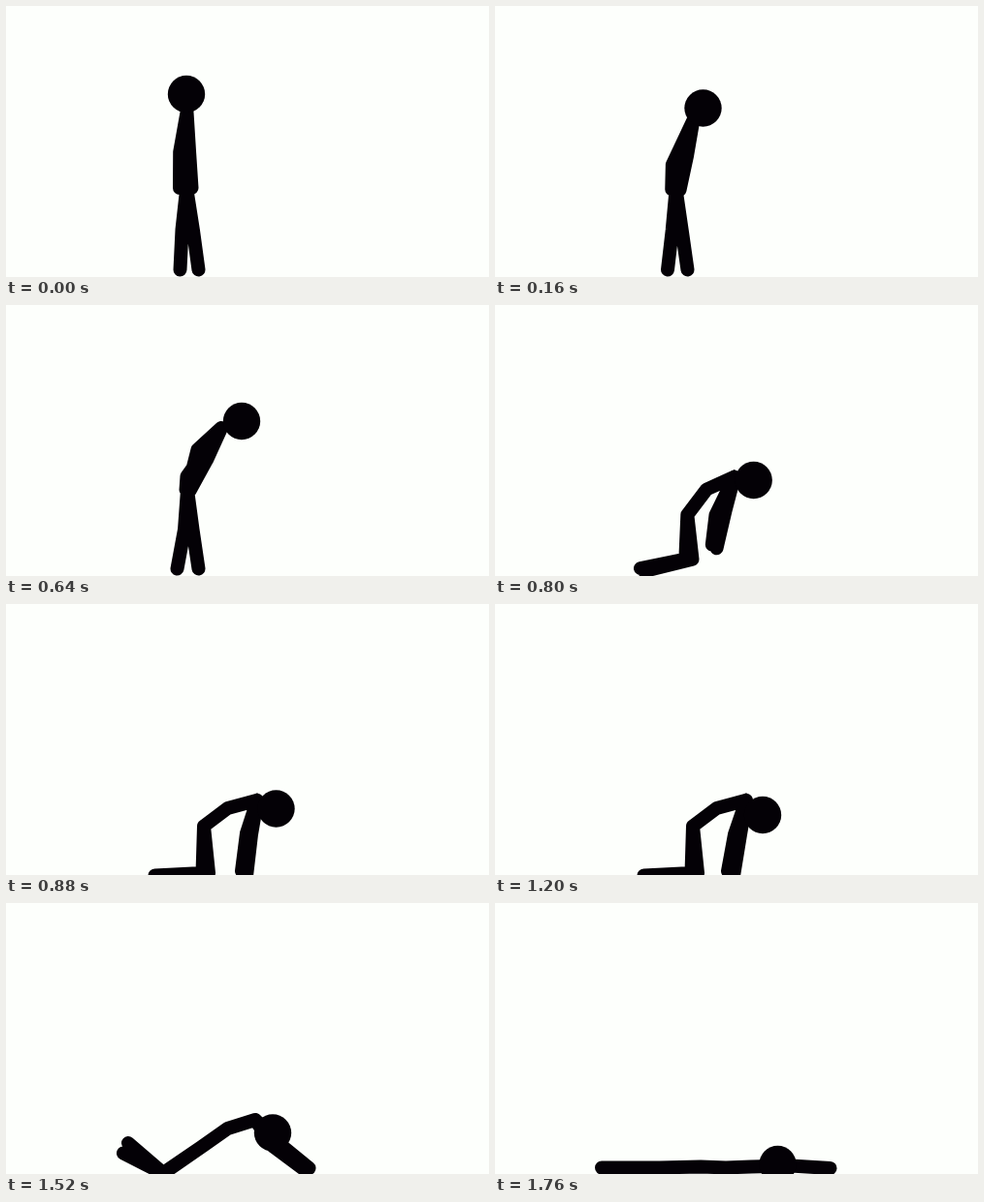
An HTML page for the animation above (1.92 s loop, 498 by 280 pixels).

```html
<!DOCTYPE html>
<html lang="en">
<head>
<meta charset="utf-8">
<title>Collapse</title>
<style>
  html, body { margin: 0; width: 100%; height: 100%; overflow: hidden; background: #fdfffc; }
  svg { display: block; width: 100%; height: 100%; fill: #040106; }
  path { fill: none; stroke: #040106; stroke-width: 14; stroke-linecap: round; stroke-linejoin: round; }
</style>
</head>
<body>
<svg viewBox="0 0 498 280">
  <path id="limbs"/>
  <circle id="head" r="19.2"/>
</svg>
<script>
const LOOP = 1920, STEP = 80, LAST = 1760;

const mix = (a, b, u) => Object.fromEntries(
  Object.keys(a).map(j => [j, a[j].map((v, n) => v + (b[j][n] - v) * u)]));

const stand = {
  head: [186, 91], neck: [186.5, 110], mid: [187, 150], hip: [186.2, 188.5],
  elbow1: [179.2, 151], elbow2: [189, 150], hand1: [179, 188], hand2: [191.5, 188],
  knee1: [181.5, 231], knee2: [193, 232], foot1: [179.5, 272.5], foot2: [198.5, 272.5]
};
const bend = {
  head: [243, 120], neck: [222, 127], mid: [197.5, 149.5], hip: [187, 191],
  elbow1: [186.5, 177], elbow2: [207, 160], hand1: [185.5, 191], hand2: [189.5, 192],
  knee1: [184, 232], knee2: [192.5, 232], foot1: [176.5, 272.5], foot2: [198.5, 272.5]
};
const kneel = {
  head: [278.5, 211.5], neck: [259, 202.8], mid: [228.5, 211], hip: [204, 229.5],
  elbow1: [248, 237], elbow2: [253, 238], hand1: [243, 276], hand2: [248, 281],
  knee1: [202.5, 278], knee2: [209, 278], foot1: [153.5, 280.5], foot2: [153.5, 280.5]
};
const sag = {
  ...kneel, head: [276, 218],
  elbow1: [247, 238], elbow2: [253, 238], hand1: [240, 276], hand2: [246, 281]
};
const slide = {
  head: [275, 237.5], neck: [257, 224], mid: [228.5, 233], hip: [203, 251],
  elbow1: [282, 249], elbow2: [276, 252], hand1: [312.5, 274], hand2: [309, 276.5],
  knee1: [162, 279.5], knee2: [162, 279], foot1: [121, 258.5], foot2: [126, 248]
};
const flat = {
  head: [291.5, 270], neck: [264, 272.4], mid: [238, 273.5], hip: [212, 272.4],
  elbow1: [305, 271.5], elbow2: [305, 271.5], hand1: [345.5, 274], hand2: [345.5, 274],
  knee1: [170, 273.5], knee2: [170, 273.5], foot1: [110, 273.5], foot2: [110, 273.5]
};
const drop = { ...mix(bend, kneel, 2 / 3), foot1: [150, 272], foot2: [154, 275] };
const reach = { ...flat, hand1: [345, 258], hand2: [345, 258] };

const linear = u => u, easeIn = u => u * u * u;
const keys = [
  [0, stand], [320, bend], [640, bend], [800, drop], [880, kneel],
  [1200, sag, easeIn], [1520, slide], [1680, reach], [LAST, flat]
];
const chains = [
  "neck mid hip", "neck elbow1 hand1", "neck elbow2 hand2",
  "hip knee1 foot1", "hip knee2 foot2"
].map(s => s.split(" "));

const limbs = document.getElementById("limbs");
const head = document.getElementById("head");

function poseAt(t) {
  const i = Math.max(1, keys.findIndex(k => k[0] >= t));
  const [t0, a] = keys[i - 1], [t1, b, ease = linear] = keys[i];
  return mix(a, b, ease((t - t0) / (t1 - t0)));
}

function draw(time) {
  const t = Math.min(Math.floor((time % LOOP) / STEP) * STEP, LAST);
  const pose = poseAt(t);
  limbs.setAttribute("d", chains.map(c => "M" + c.map(j => pose[j]).join("L")).join(""));
  head.setAttribute("cx", pose.head[0]);
  head.setAttribute("cy", pose.head[1]);
}

const start = performance.now();
function tick() {
  draw(performance.now() - start);
  requestAnimationFrame(tick);
}
tick();
</script>
</body>
</html>
```
